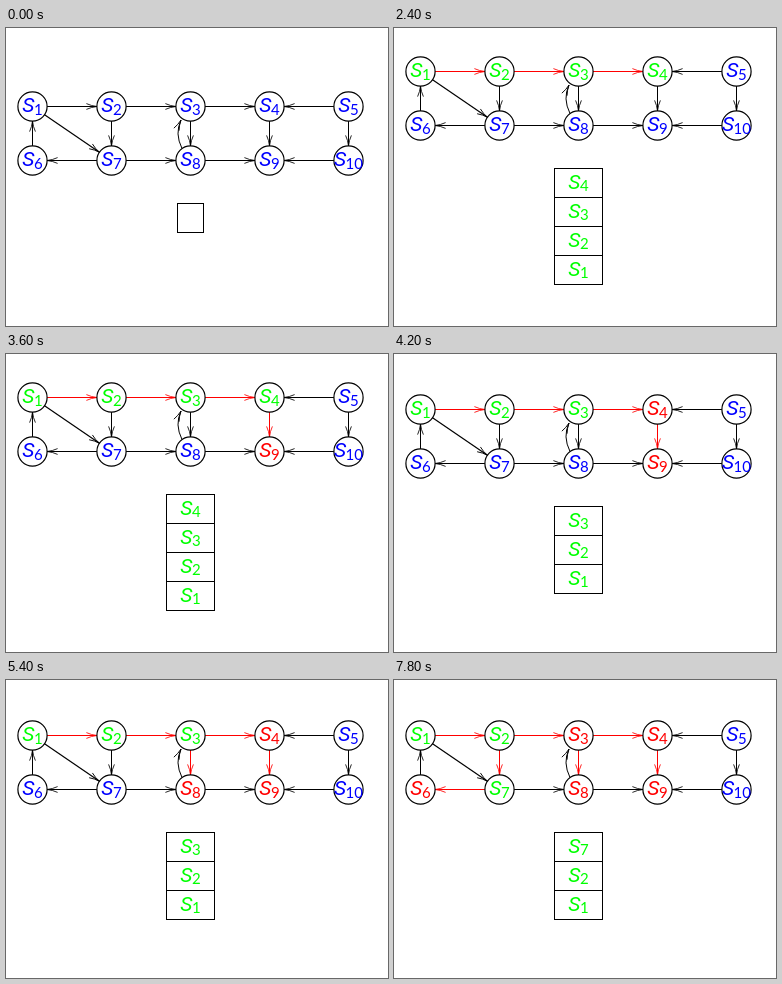
Animation of 382x298 px, one loop 8 s. Source, as an HTML page with a canvas:

```html
<!DOCTYPE html>
<html lang="en">
<head>
<meta charset="utf-8">
<title>Depth-first search</title>
<style>
  html, body { margin: 0; width: 100%; height: 100%; overflow: hidden; background: #fff; }
  canvas { display: block; }
</style>
</head>
<body>
<canvas id="stage" width="382" height="298"></canvas>
<script>
const ctx = document.getElementById('stage').getContext('2d');
const LOOP = 8000, STEP = 600;
const BLUE = '#00f', GREEN = '#0f0', RED = '#f00', BLACK = '#000';
const RADIUS = 14.6, COLUMN = 79, ROW = 54, CELL = 29;
const THIN = 0.85, NORMAL = 1, HEAVY = 1.2;
const EDGES = [[1, 2], [2, 3], [3, 4], [5, 4], [6, 1], [1, 7], [2, 7], [3, 8], [4, 9],
               [5, 10], [7, 6], [7, 8], [8, 9], [10, 9], [8, 3]];
const POP = 0;
const OPERATIONS = [1, 2, 3, 4, 9, POP, POP, 8, POP, POP, 7, 6, POP];

// Replay the search up to the given step.
function search(step) {
  const stack = [], colors = {}, used = new Set();
  for (const node of OPERATIONS.slice(0, step)) {
    if (node === POP) {
      colors[stack.pop()] = RED;
    } else {
      if (stack.length) used.add(stack.at(-1) + '-' + node);
      stack.push(node);
      colors[node] = GREEN;
    }
  }
  return { stack, colors, used };
}

function label(node, x, y, color) {
  const big = 'italic 21px Roboto, sans-serif', small = '15px Lato, sans-serif';
  ctx.fillStyle = color;
  ctx.font = small;
  const subWidth = ctx.measureText(node).width;
  ctx.font = big;
  const width = ctx.measureText('S').width - 0.5;
  const left = x - (width + subWidth) / 2;
  ctx.fillText('S', left, y + 5.5);
  ctx.font = small;
  ctx.fillText(node, left + width, y + 8);
}

function arrowHead(x, y, angle) {
  ctx.save();
  ctx.translate(x, y);
  ctx.rotate(angle);
  ctx.lineWidth = THIN;
  ctx.beginPath();
  for (const side of [-1, 1]) {
    ctx.moveTo(0, 0);
    ctx.quadraticCurveTo(-5.5, side * 0.6, -10.5, side * 2.9);
  }
  ctx.stroke();
  ctx.restore();
}

function straightArrow(a, b) {
  const angle = Math.atan2(b.y - a.y, b.x - a.x);
  const dx = RADIUS * Math.cos(angle), dy = RADIUS * Math.sin(angle);
  ctx.lineWidth = a.x === b.x || a.y === b.y ? NORMAL : HEAVY;
  ctx.beginPath();
  ctx.moveTo(a.x + dx, a.y + dy);
  ctx.lineTo(b.x - dx, b.y - dy);
  ctx.stroke();
  arrowHead(b.x - dx, b.y - dy, angle);
}

function curvedArrow(a, b) {
  const endX = b.x - 9.5, endY = b.y + 13.5, bendX = b.x - 16, bendY = b.y + 27;
  ctx.lineWidth = NORMAL;
  ctx.beginPath();
  ctx.moveTo(a.x - 8.5, a.y - 12);
  ctx.quadraticCurveTo(bendX, bendY, endX, endY);
  ctx.stroke();
  arrowHead(endX, endY, Math.atan2(endY - bendY, endX - bendX));
}

function drawStack(stack, growth) {
  const top = Math.floor(175.5 - 11.75 * growth) + 0.5;
  const bottom = Math.floor(204.75 + 17.4 * growth) + 0.5;
  ctx.strokeStyle = BLACK;
  ctx.lineWidth = NORMAL;
  if (!stack.length) {
    ctx.strokeRect(171.5, top, 26, bottom - top);
    return;
  }
  ctx.strokeRect(160.5, top, 48, bottom - top);
  stack.forEach((node, i) => {
    const base = bottom - CELL * i;
    if (i) {
      ctx.beginPath();
      ctx.moveTo(160.5, base);
      ctx.lineTo(208.5, base);
      ctx.stroke();
    }
    label(node, 184.5, base - CELL / 2, GREEN);
  });
}

function draw(time) {
  const { stack, colors, used } = search(Math.floor(time % LOOP / STEP));
  const growth = Math.max(0, stack.length - 1);
  const firstRow = Math.floor(78.5 - 11.7 * growth) + 0.5;
  const place = node => ({
    x: 26.5 + COLUMN * ((node - 1) % 5),
    y: firstRow + (node > 5 ? ROW : 0)
  });

  ctx.fillStyle = '#fff';
  ctx.fillRect(0, 0, 382, 298);
  for (const [from, to] of EDGES) {
    ctx.strokeStyle = used.has(from + '-' + to) ? RED : BLACK;
    const arrow = from === 8 && to === 3 ? curvedArrow : straightArrow;
    arrow(place(from), place(to));
  }
  for (let node = 1; node <= 10; node++) {
    const { x, y } = place(node);
    ctx.strokeStyle = BLACK;
    ctx.lineWidth = HEAVY;
    ctx.beginPath();
    ctx.arc(x, y, RADIUS, 0, 2 * Math.PI);
    ctx.stroke();
    label(node, x, y, colors[node] || BLUE);
  }
  drawStack(stack, growth);
}

const start = performance.now();
function tick() {
  draw(performance.now() - start);
  requestAnimationFrame(tick);
}
tick();
</script>
</body>
</html>
```
